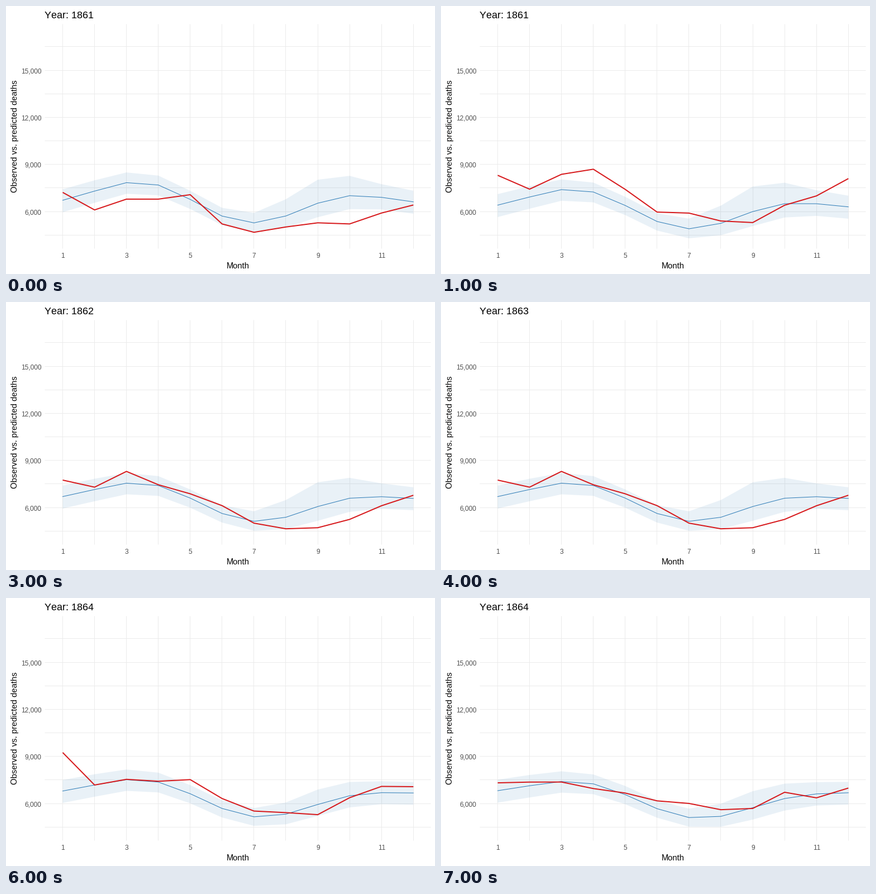
These frames come from a looping animation (768x480 px, 8000 ms). A matplotlib script:

```python
import numpy as np
import matplotlib
import matplotlib.pyplot as plt
from matplotlib.animation import FuncAnimation

matplotlib.rcParams["font.family"] = "Liberation Sans"
matplotlib.rcParams["text.hinting"] = "native"
matplotlib.rcParams["text.kerning_factor"] = 6  # plain letter spacing

W, H, DPI = 768, 480, 96
PX = 72 / DPI  # one pixel in points
RED, BLUE, GRID, TICK = "#d7191c", "#2c7bb6", "#ebebeb", "#4d4d4d"
FIRST_YEAR = 1861
COUNT = 8

MONTHS = np.arange(1, 13)
SEASON = 2 * np.pi * (MONTHS - 1) / 12

# Per year, in thousands of deaths: mean level, extra autumn uncertainty,
# and turning points {month: observed minus predicted}.
YEARS = [
    (6.67, 0.95, {1: .5, 2: -1.2, 4: -.9, 5: .3, 6: -.5, 8: -.7, 10: -1.8, 12: -.2}),
    (6.26, 1.05, {1: 1.9, 2: .5, 4: 1.45, 6: .6, 7: 1, 9: -.7, 11: .5, 12: 1.8}),
    (6.45, 1.00, {1: 1.05, 2: .15, 3: .75, 4: .05, 6: .5, 9: -1.35, 10: -1.35, 12: .2}),
    (6.45, 0.40, {1: 2.45, 2: 0, 4: .05, 5: .9, 8: .1, 9: -.65, 11: .4}),
    (6.37, 0.50, {1: .5, 4: -.3, 7: .9, 9: -.05, 10: .4, 11: -.25, 12: .3}),
]


def month_x(month):
    return 101.5 + 57.07 * (month - 1)


def value_y(thousands):
    return 115 + (15 - thousands) * 253 / 9


def curves(t):
    """Heights of the observed, predicted, upper and lower curves of year t."""
    level, spread, turns = YEARS[t]
    predicted = (level
                 + (0.72 + 0.034 * t) * np.cos(SEASON)
                 + (0.34 + 0.032 * t) * np.sin(SEASON)
                 - (0.676 - 0.066 * t) * np.cos(2 * SEASON)
                 + (0.20 - 0.053 * t) * np.sin(2 * SEASON))
    observed = predicted + np.interp(MONTHS, list(turns), list(turns.values()))
    autumn = spread * np.exp(-((MONTHS - 9.1) / 1.5) ** 2)
    winter = 0.1 * np.cos(SEASON)
    upper = predicted + 0.60 + winter + autumn
    lower = predicted - 0.66 - winter - 0.3 * autumn
    return [value_y(c) for c in (observed, predicted, upper, lower)]


fig = plt.figure(figsize=(W / DPI, H / DPI), dpi=DPI, facecolor="white")
ax = fig.add_axes([0, 0, 1, 1])
ax.set_xlim(0, W)
ax.set_ylim(H, 0)
ax.axis("off")


def label(x, y, text, size, color="black", **kw):
    return ax.text(x, y, text, fontsize=size * PX, color=color,
                   va="baseline", **kw)


def grid_line(xs, ys):
    ax.plot(xs, ys, color=GRID, lw=PX, solid_capstyle="butt",
            snap=True, zorder=1)


# Grid and axis labels
for v in np.arange(4.5, 17, 1.5):
    y = int(value_y(v))
    grid_line([69, 760], [y, y])
    if v >= 6 and v % 3 == 0:
        label(63.4, y + 6, f"{int(v)},000", 12, TICK, ha="right")
for m in MONTHS:
    x = int(month_x(m))
    grid_line([x, x], [32, 434])
    if m % 2:
        label(x + 0.5, 451, str(m), 12, TICK, ha="center")
label(415, 470, "Month", 14.8, ha="center")
label(20, 233, "Observed vs. predicted deaths", 14.9, ha="center",
      rotation=90, rotation_mode="anchor")
title = label(69, 22, "", 18)

# Moving parts
xs = month_x(MONTHS)
band, = ax.fill(xs, xs, color=BLUE, alpha=0.1, lw=0, zorder=2)
predicted_line, = ax.plot([], [], color=BLUE, lw=PX, zorder=3)
observed_line, = ax.plot([], [], color=RED, lw=2 * PX, zorder=4,
                         solid_capstyle="butt", solid_joinstyle="round")


def draw(i):
    # The curves step to the next year one beat before the title does.
    observed, predicted, upper, lower = curves((i + 1) // 2)
    title.set_text(f"Year: {FIRST_YEAR + i // 2}")
    band.set_xy(np.column_stack([np.append(xs, xs[::-1]),
                                 np.append(upper, lower[::-1])]))
    predicted_line.set_data(xs, predicted)
    observed_line.set_data(xs, observed)
    return title, band, predicted_line, observed_line


anim = FuncAnimation(fig, draw, frames=COUNT, interval=1000,
                     repeat=True, repeat_delay=0)
plt.show()
```
